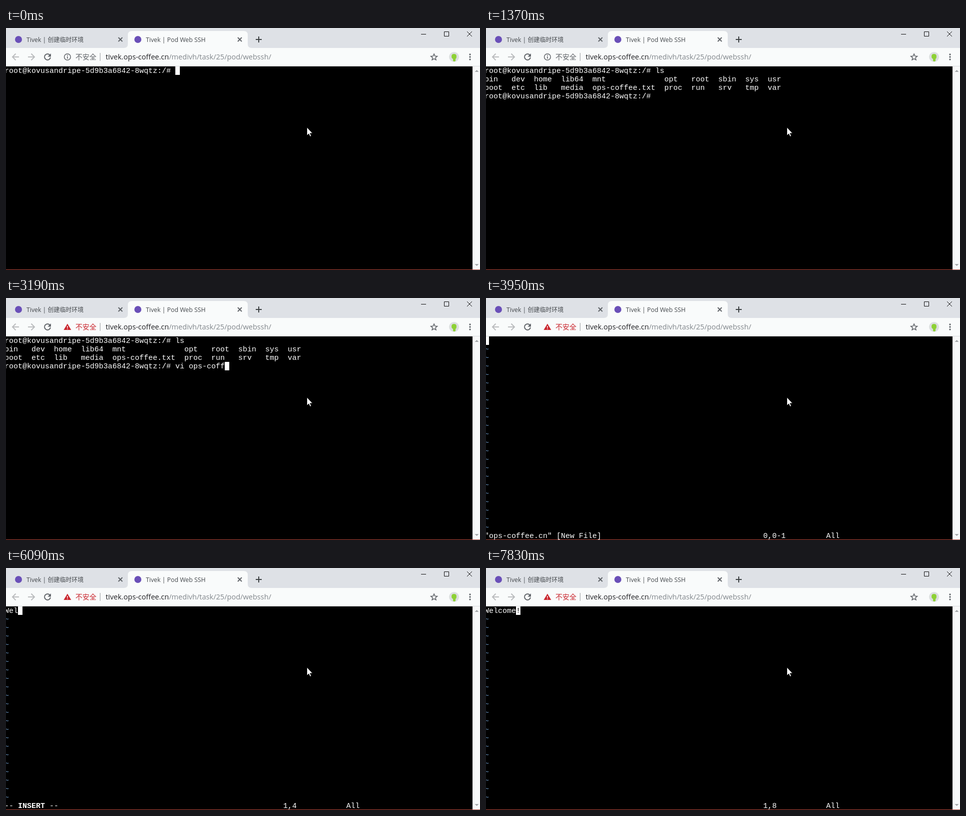
Recreate the animation shown at these times as an HTML page. Size 949 by 485 pixels, loop 8000 ms.

```html
<!DOCTYPE html>
<html lang="zh">
<head>
<meta charset="utf-8">
<title>Pod Web SSH</title>
<style>
  html, body { margin: 0; width: 100%; height: 100%; overflow: hidden; background: #000; }
  svg { display: block; }
  text { white-space: pre; }
  .ui { font-family: "Open Sans", "Noto Sans CJK SC", "Noto Sans CJK", sans-serif; }
  .tab { font-size: 12.3px; fill: #45494d; }
  .line { fill: none; stroke: #5f6368; stroke-width: 2; }
  .thin { fill: none; stroke: #111; stroke-width: 1; }
  .term { font: 15px "Liberation Mono", "Courier New", monospace; fill: #fff; }
</style>
</head>
<body>
<svg width="949" height="485" viewBox="0 0 949 485">
  <!-- terminal -->
  <rect width="949" height="485"/>
  <g id="screen" class="term"></g>
  <rect id="cursor" width="9" height="17" fill="#fff"/>
  <text id="under" class="term" style="fill:#000"></text>

  <!-- tab strip -->
  <rect width="949" height="40" fill="#dee1e6"/>
  <path d="M236 40q8 0 8-8V14q0-8 8-8H476q8 0 8 8V32q0 8 8 8z" fill="#f9fbfb"/>
  <circle cx="25" cy="23" r="7" fill="#6a4fb8"/>
  <circle cx="264" cy="23" r="7" fill="#6a4fb8"/>
  <text class="ui tab" x="41" y="28">Tivek | <tspan font-size="12">创建临时环境</tspan></text>
  <text class="ui tab" x="280" y="28">Tivek | Pod Web SSH</text>
  <path class="line" stroke-width="1.6" d="M225 19l8 8m0-8l-8 8M464 19l8 8m0-8l-8 8"/>
  <path class="line" style="stroke:#3c4043" d="M500 23h12M506 17v12"/>
  <path class="thin" d="M831 12.5h10M877.5 7.5h9v9h-9zM923 7l10 10m0-10l-10 10"/>

  <!-- toolbar -->
  <rect y="40" width="949" height="36" fill="#f9fbfb"/>
  <rect y="76" width="949" height="1" fill="#d9dcdf"/>
  <path class="line" style="stroke:#babcbe" d="M26 58H13m6.5-6.5L13 58l6.5 6.5M44 58h13m-6.500-6.500L57 58l-6.500 6.500"/>
  <path class="line" d="M88 54.500A6 6 0 1 0 89 59"/>
  <path d="M90 51v6.500h-6.500z" fill="#5f6368"/>
  <g id="info">
    <circle class="line" cx="123" cy="58" r="6.300" style="stroke-width:1.500"/>
    <path class="line" style="stroke-width:1.600" d="M123 57v4.500M123 54v1.700"/>
  </g>
  <g id="warn">
    <path d="M123 51.500l7.500 12.500h-15z" fill="#c9252d"/>
    <path d="M123 56v4M123 61v1.600" stroke="#fff" stroke-width="1.500"/>
  </g>
  <text id="safety" class="ui" x="139" y="63" font-size="14">不安全</text>
  <rect x="188" y="50" width="1" height="16" fill="#9a9da1"/>
  <text class="ui" x="531" y="63" text-anchor="end" font-size="14.550" fill="#202124">tivek.ops-coffee.cn<tspan fill="#80868b">/medivh/task/25/pod/webssh/</tspan></text>
  <path class="line" style="stroke-width:1.500" d="M857 52l1.800 4.200 4.600.4-3.500 3 1.100 4.400-4-2.300-4 2.300 1.100-4.400-3.500-3 4.600-.4z"/>
  <circle cx="897" cy="58" r="10" fill="#dcdfe1"/>
  <path d="M892 57q0-5 5-5t5 5q0 4-2 5v4q-2.500 2-5 0v-4q-3-1-3-5z" fill="#8ed136"/>
  <g fill="#5f6368">
    <circle cx="929" cy="53" r="1.700"/><circle cx="929" cy="58" r="1.700"/><circle cx="929" cy="63" r="1.700"/>
  </g>

  <!-- scrollbar, lower edge, pointer -->
  <rect x="934" y="77" width="15" height="408" fill="#f8f9f9"/>
  <path d="M938.500 88h8l-4-4zM938.500 473h8l-4 4z" fill="#a3a6a8"/>
  <rect y="484" width="949" height="1" fill="#b8483c"/>
  <path d="M602.500 199v16.500l3.700-3.500 2.600 5.500 2.400-1.100-2.500-5.400h5z" fill="#fff" stroke="#000" stroke-width=".8"/>
</svg>
<script>
const $ = id => document.getElementById(id);
const LOOP = 8000, ROWS = 24, LAST = ROWS - 1;
const colX = c => c * 9 - 3, rowY = r => 77 + r * 17;

const PROMPT = "root@kovusandripe-5d9b3a6842-8wqtz:/# ";
const LISTING = [
  "bin   dev  home  lib64  mnt             opt   root  sbin  sys  usr",
  "boot  etc  lib   media  ops-coffee.txt  proc  run   srv   tmp  var"
];
const COMMAND = "vi ops-coffee.cn", WORD = "Welcome!";

// key press times in ms
const LS_KEYS = [400, 580];
const VI_KEYS = [1720, 1937, 2045, 2153, 2262, 2370, 2740, 2853, 2965, 3078, 3190, 3280, 3430, 3580, 3730, 3730];
const WORD_KEYS = [5360, 5720, 6090, 6300, 6403, 6507, 6610, 7010];
const RULER_KEYS = [5360, 5820, 6090, 6300, 6403, 6507, 6610, 7130];
const typed = (keys, t) => keys.filter(k => k <= t).length;

const lines = Array.from({ length: ROWS }, (_, r) => {
  const line = document.createElementNS("http://www.w3.org/2000/svg", "text");
  line.setAttribute("x", colX(0));
  line.setAttribute("y", rowY(r) + 13);
  return $("screen").appendChild(line);
});

function shell(t) {
  const ls = PROMPT + "ls".slice(0, typed(LS_KEYS, t));
  if (t < 880) return { text: [ls], row: 0, col: ls.length };
  const vi = PROMPT + COMMAND.slice(0, typed(VI_KEYS, t));
  return { text: [ls, ...LISTING, vi], row: 3, col: vi.length };
}

function ruler(t) {
  if (t < 4910) return "0,0-1";
  if (t < 5360) return "0,1";
  return "1," + (t < 7755 ? typed(RULER_KEYS, t) + 1 : 8);
}

function vim(t) {
  const word = WORD.slice(0, typed(WORD_KEYS, t));
  const insert = t >= 4760 && t < 7605;
  const mode = insert ? "-- INSERT --" : t < 4760 ? '"ops-coffee.cn" [New File]' : "";
  const pending = t >= 7530 && t < 7605 ? "^[" : "";
  const status = (mode.padEnd(51) + pending).padEnd(62) + ruler(t).padEnd(14) + "All";
  const text = [word, ...Array(ROWS - 2).fill("~"), status];
  return { text, row: 0, col: t < 7680 ? word.length : 7, insert, vim: true };
}

function put(el, row, col, dy = 0) {
  el.setAttribute("x", colX(col));
  el.setAttribute("y", rowY(row) + dy);
}

function setLine(r, view) {
  const text = view.text[r] || "", line = lines[r];
  line.style.fill = view.vim && r > 0 && r < LAST ? "#729fcf" : "#fff";
  line.textContent = text;
  if (r === LAST && view.insert) {
    line.innerHTML = '-- <tspan font-weight="bold">INSERT</tspan>' + text.slice(9);
  }
}

function draw(t) {
  const view = t < 3950 ? shell(t) : vim(t);
  lines.forEach((_, r) => setLine(r, view));

  const hidden = (t >= 1370 && t < 1720) || (t >= 4430 && t < 4760);
  $("cursor").style.display = hidden ? "none" : "";
  put($("cursor"), view.row, view.col);
  put($("under"), view.row, view.col, 13);
  $("under").textContent = view.text[view.row][view.col] || "";

  const alert = t >= 1828;
  $("info").style.display = alert ? "none" : "";
  $("warn").style.display = alert ? "" : "none";
  $("safety").style.fill = alert ? "#c9252d" : "#5f6368";
}

const start = performance.now();
function tick() {
  draw((performance.now() - start) % LOOP);
  requestAnimationFrame(tick);
}
tick();
</script>
</body>
</html>
```
